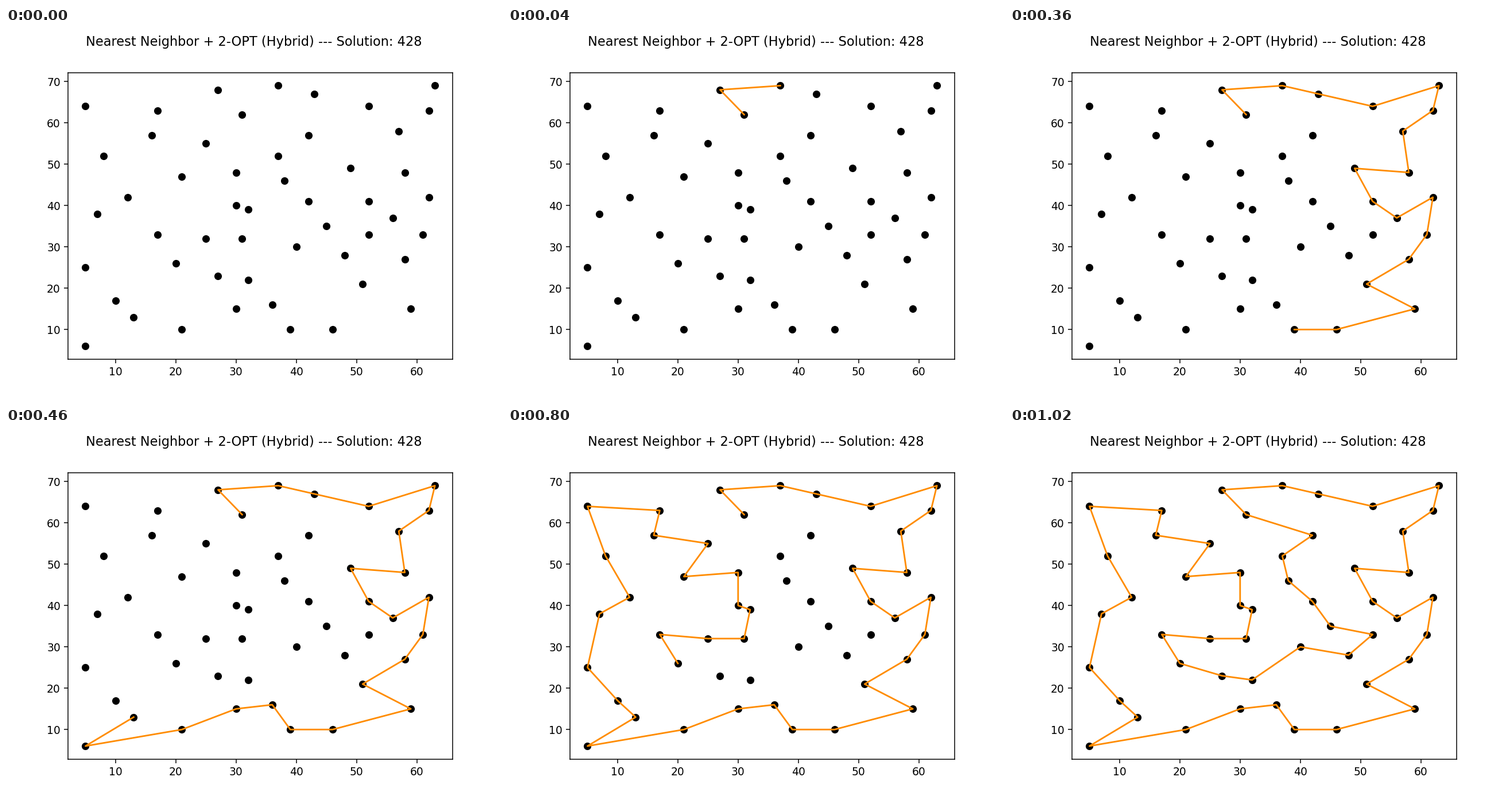
A matplotlib script that plays this animation: 864 px wide and 648 px high, repeating every 1240 ms.

```python
import matplotlib.pyplot as plt
from matplotlib.animation import FuncAnimation

FRAMES, INTERVAL = 62, 20
GREY = "#a9a9a9"

# Cities in the order the tour visits them
TOUR = [
    (31, 62), (27, 68), (37, 69), (43, 67), (52, 64), (63, 69), (62, 63),
    (57, 58), (58, 48), (49, 49), (52, 41), (56, 37), (62, 42), (61, 33),
    (58, 27), (51, 21), (59, 15), (46, 10), (39, 10), (36, 16), (30, 15),
    (21, 10), (5, 6), (13, 13), (10, 17), (5, 25), (7, 38), (12, 42),
    (8, 52), (5, 64), (17, 63), (16, 57), (25, 55), (21, 47), (30, 48),
    (30, 40), (32, 39), (31, 32), (25, 32), (17, 33), (20, 26), (27, 23),
    (32, 22), (40, 30), (48, 28), (52, 33), (45, 35), (42, 41), (38, 46),
    (37, 52), (42, 57),
]
xs, ys = zip(*TOUR, TOUR[0])

fig, ax = plt.subplots(figsize=(6.4, 4.8), dpi=135)
fig.suptitle("Nearest Neighbor + 2-OPT (Hybrid) --- Solution: 428")
ax.plot(xs[:-1], ys[:-1], "o", color="black")
ax.set_xlim(ax.get_xlim())
ax.set_ylim(ax.get_ylim())
path, = ax.plot([], [], color="darkorange", lw=1.5, zorder=3)


def update(i):
    edges = min(i, len(TOUR))
    count = edges + 1 if edges else 0
    path.set_data(xs[:count], ys[:count])

    # The first edge appears with a single grey flash
    flash = i == 1
    path.set_color("#2d2d2d" if flash else "darkorange")
    for part in (fig.patch, ax.patch):
        part.set_facecolor(GREY if flash else "white")
    return path,


anim = FuncAnimation(fig, update, frames=FRAMES, interval=INTERVAL,
                     repeat=True, repeat_delay=0, blit=False)
plt.show()
```
